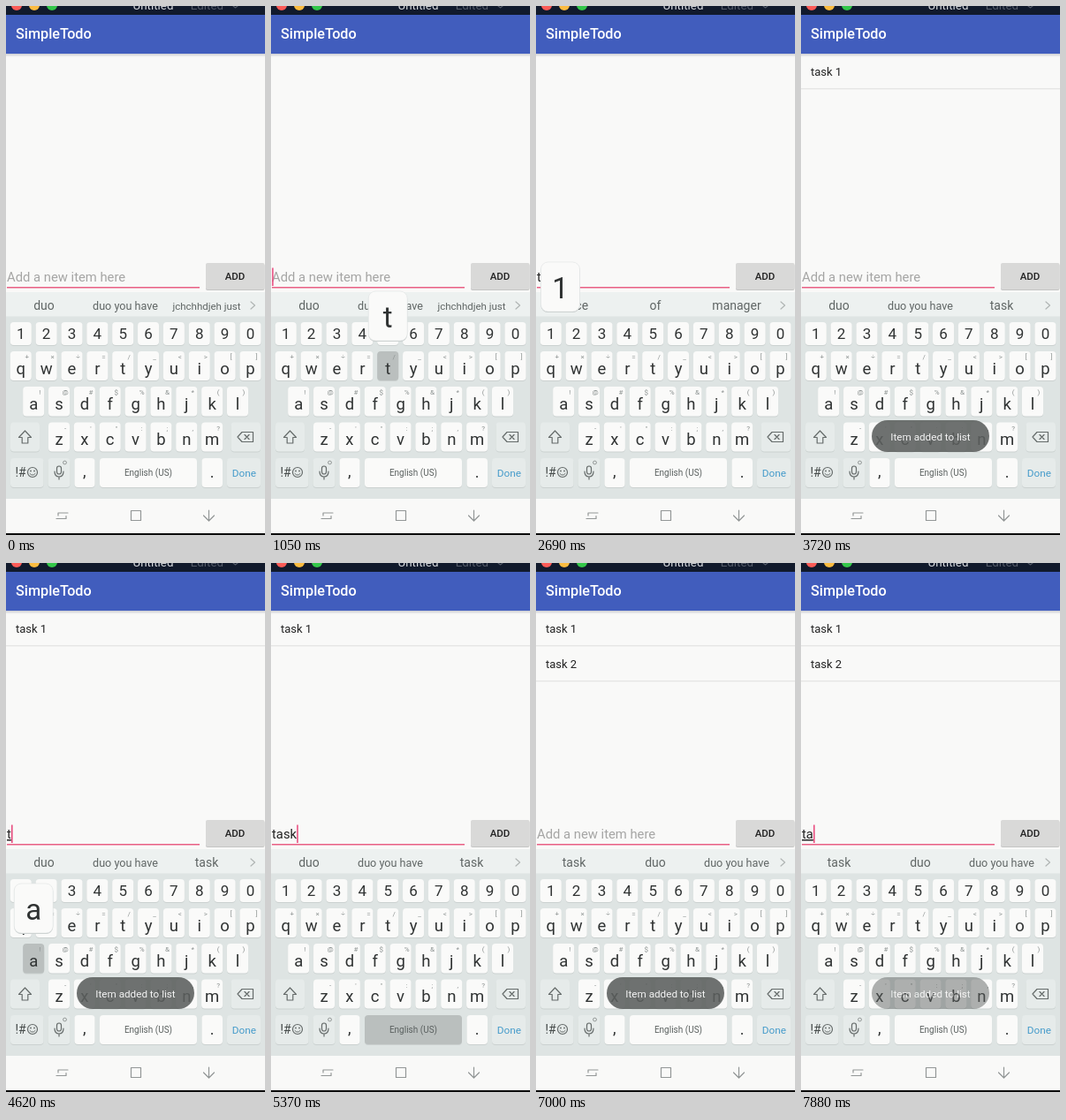
An HTML page that plays this animation: 293 px wide and 599 px high, repeating every 8000 ms.

```html
<!DOCTYPE html>
<html>
<head>
<meta charset="utf-8">
<style>
html, body { margin: 0; width: 100%; height: 100%; overflow: hidden; background: #f9f9f8 }
svg { display: block; width: 293px; height: 599px; font-family: Roboto, sans-serif }
text { white-space: pre }
.line { fill: none; stroke-linecap: round; stroke-linejoin: round }
</style>
</head>
<body>
<svg id="stage" viewBox="0 0 293 599"></svg>
<script>
const LOOP = 8000;
const stage = document.getElementById('stage');
const keys = {};

const rect = (x, y, w, h, fill, r = 0, extra = '') =>
  `<rect x="${x}" y="${y}" width="${w}" height="${h}" rx="${r}" fill="${fill}" ${extra}/>`;
const label = (x, y, size, fill, str, anchor = 'start', extra = '') =>
  `<text x="${x}" y="${y}" font-size="${size}" fill="${fill}" text-anchor="${anchor}" ${extra}>${
    str.replace(/&/g, '&amp;').replace(/</g, '&lt;')}</text>`;
const line = (d, color, width = 1.2) =>
  `<path class="line" d="${d}" stroke="${color}" stroke-width="${width}"/>`;
const dot = (x, y, r, fill, extra = '') => `<circle cx="${x}" cy="${y}" r="${r}" fill="${fill}" ${extra}/>`;

function key(id, x, y, w, h, fill = '#fafaf9') {
  keys[id] = { cx: x + w / 2, top: y, fill };
  return rect(x, y + 1, w, h, '#cbd1d0', 4) + rect(x, y, w, h, fill, 4, `id="key-${id}"`);
}

function keyRow(chars, hints, firstX, y, h, size, baseline) {
  return [...chars].map((c, i) => {
    const cx = firstX + i * 28.85;
    return key(c, cx - 12, y, 24, h) + label(cx, baseline, size, '#303333', c, 'middle') +
      (hints ? label(cx + 7, y + 9, 8, '#8c9291', hints[i], 'middle') : '');
  }).join('');
}

function keyboard() {
  const soft = '#e6ebea', icon = '#656b6a';
  return rect(0, 324, 293, 28, '#edf1f0') + rect(0, 351.5, 293, 206.5, '#dee4e3') +
    line('M277 335l4.5 4-4.5 4', '#b0b5b4') +
    keyRow('1234567890', '', 16.8, 358, 26, 17, 377) +
    keyRow('qwertyuiop', '+×÷=/_<>[]', 16.8, 391, 33, 18.5, 417) +
    keyRow('asdfghjkl', '!@#$%&*()', 31.2, 431, 33.5, 18.5, 457) +
    keyRow('zxcvbnm', '-\'":;,?', 60, 471.5, 33, 18.5, 497) +
    key('shift', 5, 471.5, 33, 33, soft) + line('M21.5 481l7 7.500h-3.700v6.500h-6.600v-6.500h-3.700z', icon) +
    key('back', 254.500, 471.5, 33.5, 33, soft) +
    line('M262 488l5-5.500h12.500v11h-12.500zM270 485.500l5 5m0-5l-5 5', icon) +
    key('symbols', 5, 512, 37.5, 33, soft) + label(10.5, 533, 14, '#454a49', '!#') +
    dot(30, 528, 5.500, 'none', `stroke="${icon}" stroke-width="1.2"`) +
    dot(28, 526.5, .9, icon) + dot(32, 526.5, .9, icon) + line('M27 529.5q3 3.500 6 0', icon, 1) +
    key('mic', 47.500, 512, 25, 33, soft) + rect(57.500, 521, 5, 9, 'none', 2.5, `stroke="${icon}" stroke-width="1.2"`) +
    line('M55 527q0 6 5 6t5-6M60 533v3', icon) + dot(66.500, 517, 1.900, 'none', 'stroke="#929796"') +
    key('comma', 77.500, 512, 23, 33) + label(88.8, 533, 18, '#303333', ',', 'middle') +
    key('space', 106, 512, 110, 33) + label(161, 532, 10, '#5b6160', 'English (US)', 'middle') +
    key('dot', 221.500, 512, 23.5, 33) + label(233.2, 534, 18, '#303333', '.', 'middle') +
    key('done', 250, 512, 38, 33, soft) + label(269.3, 532.5, 11.800, '#479ccb', 'Done', 'middle');
}

stage.innerHTML =
  rect(0, 0, 293, 599, '#f9f9f8') + rect(0, 0, 293, 10, '#111a2c') +
  dot(12, -1, 6, '#fc5b57') + dot(32, -1, 6, '#fdbc40') + dot(52, -1, 6, '#34c84a') +
  label(143.5, 4, 13.4, '#d9dce0', 'Untitled') + label(195, 4, 13.4, '#545b69', '— Edited') +
  line('M257 0l2.500 2 2.500-2', '#545b69') +
  rect(0, 54, 293, 2, '#d8d9dc') + rect(0, 56, 293, 1.5, '#eeeeee') + rect(0, 10, 293, 44, '#415dbd') +
  label(11, 37, 16.2, '#fff', 'SimpleTodo', 'start', 'font-weight="500"') +
  [1, 2].map(n => `<g id="item${n}">` + label(11, 38.5 + 40 * n, 13, '#222', 'task ' + n) +
    rect(0, 53.300 + 40 * n, 293, 1, '#dededd') + '</g>').join('') +
  label(1, 312, 14.8, '#a5a5a4', 'Add a new item here', 'start', 'id="hint"') +
  label(1, 312, 14.8, '#222', '', 'start', 'id="entry"') +
  rect(1, 318, 218, 1.500, '#e95f84') + rect(0, 296.5, 1.5, 20.5, '#e8467a', 0, 'id="cursor"') +
  rect(226, 292, 66.500, 30, '#c5c5c4', 2) + rect(226, 291, 66.500, 30, '#d9d9d8', 2, 'id="add"') +
  label(259, 310, 11.500, '#222', 'ADD', 'middle', 'font-weight="500"') +
  keyboard() +
  [43, 135, 227].map((x, i) => label(x, 344, 14, '#606665', '', 'middle', `id="word${i}"`)).join('') +
  rect(0, 558, 293, 39, '#f9f9f8') + rect(0, 597, 293, 2, '#080808') +
  line('M70 574H59v3M57 580.500H68v-3M141.500 571.500h11v11h-11zM229.500 571v12m-6-6l6 6 6-6', '#939797') +
  '<g id="popup">' + rect(-22, 1, 44, 56, '#c5cbca', 8) +
  rect(-22, 0, 44, 56, '#fafaf9', 8, 'stroke="#dfe3e2" stroke-width=".6"') +
  label(0, 41, 33, '#303333', '', 'middle', 'id="popupText"') + '</g>' +
  '<g id="toast">' + rect(80, 469, 133, 36, '#5c5f5e', 18, 'opacity=".88"') +
  label(146.5, 491.500, 11.700, '#f4f4f4', 'Item added to list', 'middle') + '</g>';

// Timeline: each entry overrides part of the state from its time on.
const typeWord = t => [
  [t, { key: 't', cursor: 1 }], [t + 150, { text: 't', key: '' }],
  [t + 300, { key: 'a' }], [t + 450, { text: 'ta', key: '' }],
  [t + 600, { key: 's' }], [t + 750, { text: 'tas', key: 'k' }], [t + 900, { text: 'task', key: '' }]
];
const addItem = (t, items, words) => [
  [t, { pressed: 1 }], [t + 150, { text: '', items }], [t + 290, { toast: .06 }],
  [t + 440, { toast: .6, pressed: 0, words }], [t + 580, { toast: 1, cursor: 0 }]
];
const nextWords = ['force', 'of', 'manager'];
const timeline = [
  [0, { text: '', key: '', cursor: 0, pressed: 0, items: 0, toast: 0, words: ['duo', 'duo you have', 'jchchhdjeh just'] }],
  [450, { cursor: 1 }],
  ...typeWord(1050),
  [2250, { key: 'space' }], [2390, { key: '', text: 'task ' }],
  [2690, { key: '1', words: nextWords }], [2830, { key: '', text: 'task 1', words: ['1', '1st', '11th'] }],
  ...addItem(3130, 1, ['duo', 'duo you have', 'task']),
  ...typeWord(4320),
  [4770, { toast: .55 }], [4920, { toast: 0 }],
  [5370, { key: 'space' }], [5520, { key: '', text: 'task ' }],
  [5670, { words: nextWords }], [5820, { key: '2' }],
  [5970, { key: '', text: 'task 2', words: ['2', '21st', '2nd'] }],
  ...addItem(6270, 2, ['task', 'duo', 'duo you have']),
  [7580, { key: 't', cursor: 1 }], [7730, { text: 't', key: 'a' }],
  [7880, { text: 'ta', key: '', toast: .55 }]
];

const $ = id => document.getElementById(id);
const set = (id, attrs) => Object.entries(attrs).forEach(([k, v]) => $(id).setAttribute(k, v));
const show = (id, on) => set(id, { opacity: +on });

function render(t) {
  const s = Object.assign({}, ...timeline.filter(e => e[0] <= t).map(e => e[1]));
  show('item1', s.items > 0);
  show('item2', s.items > 1);
  show('hint', !s.text);
  show('toast', s.toast);
  set('add', { fill: s.pressed ? '#c5c6c3' : '#d9d9d8' });

  const composing = s.key !== 'space' && !s.text.includes(' ');
  $('entry').textContent = s.text;
  set('entry', { 'text-decoration': composing ? 'underline' : 'none' });
  set('cursor', { x: 1.2 + (s.text ? $('entry').getComputedTextLength() : 0), opacity: s.cursor });

  s.words.forEach((word, i) => {
    $('word' + i).textContent = word;
    set('word' + i, { 'font-size': word.length > 13 ? 11.5 : word.length > 9 ? 12.6 : 14 });
  });

  for (const id in keys)
    set('key-' + id, { fill: id === s.key && !/\d/.test(id) ? '#babfbe' : keys[id].fill });
  const popup = s.key.length === 1;
  show('popup', popup);
  if (popup) {
    const { cx, top } = keys[s.key];
    $('popupText').textContent = s.key;
    set('popup', { transform: `translate(${Math.max(27.5, cx)} ${top - 68})` });
  }
}

function tick() {
  render(performance.now() % LOOP);
  requestAnimationFrame(tick);
}
tick();
</script>
</body>
</html>
```
